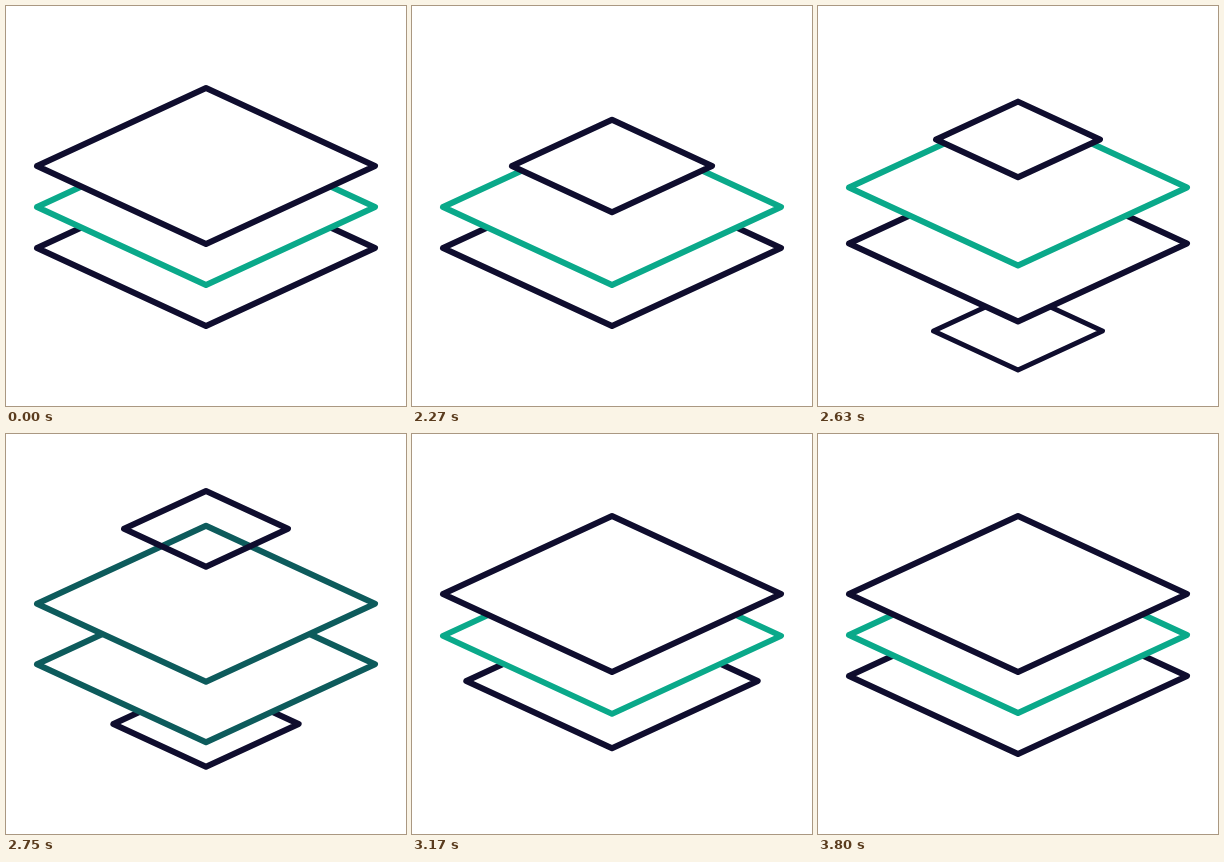
An HTML page that plays this animation: 400 px wide and 400 px high, repeating every 3.83 s.

```html
<!DOCTYPE html>
<html lang="en">
<head>
<meta charset="utf-8">
<title>Layer stack</title>
<style>
  html, body { margin: 0; width: 100%; height: 100%; overflow: hidden; background: #fff; }
  svg { display: block; width: 100vw; height: 100vh; }
  polygon { fill: #fff; stroke-linejoin: round; }
</style>
</head>
<body>
<svg viewBox="0 0 400 400">
  <polygon id="incoming"/>
  <polygon id="lower"/>
  <polygon id="middle"/>
  <polygon id="upper"/>
</svg>
<script>
const LOOP = 3830, HOLD = 2030, STEP = 30;
const NAVY = [15, 13, 46], GREEN = [10, 169, 138];
const HALF_W = 169, HALF_H = 78, STROKE = 6, SMALL = 0.485;
const REST = { upper: 160, middle: 201, lower: 242 };

const mix = (a, b, p) => a + (b - a) * p;
const span = (t, start, end) => Math.min(1, Math.max(0, (t - start) / (end - start)));
const smooth = x => x * x * (3 - 2 * x);
const blend = (from, to, p) => `rgb(${from.map((c, i) => Math.round(mix(c, to[i], p)))})`;

// Cubic easing with control points (a, 0) and (b, 1).
function bezier(a, b) {
  return x => {
    if (x <= 0 || x >= 1) return x;
    let lo = 0, hi = 1;
    for (let i = 0; i < 24; i++) {
      const s = (lo + hi) / 2, r = 1 - s;
      if (3 * a * s * r * r + 3 * b * s * s * r + s * s * s < x) lo = s;
      else hi = s;
    }
    return smooth((lo + hi) / 2);
  };
}
const settle = bezier(0.45, 0.6);
const grow = bezier(0.363, 0.325);

function draw(id, y, { scale = 1, width = STROKE, color = blend(NAVY, NAVY, 0), fill = 1 } = {}) {
  const el = document.getElementById(id);
  const w = HALF_W * scale, h = HALF_H * scale;
  el.setAttribute("points", `200,${y - h} ${200 + w},${y} 200,${y + h} ${200 - w},${y}`);
  el.setAttribute("stroke", color);
  el.setAttribute("stroke-width", width);
  el.setAttribute("fill-opacity", fill);
  el.style.display = width > 0 ? "" : "none";
}

function render(t) {
  const tint = span(t, 2650, 2850);

  draw("upper", mix(REST.upper, 68, smooth(span(t, 2482, 2899))), {
    scale: mix(1, SMALL, smooth(span(t, 2005, 2380))),
    width: STROKE * (1 - span(t, 2800, 2900)),
    fill: 1 - span(t, 2640, 2740)
  });

  draw("middle", mix(REST.middle, REST.upper, smooth(span(t, 2340, 2940))), {
    color: blend(GREEN, NAVY, tint)
  });

  draw("lower", mix(REST.lower, REST.middle, settle(span(t, 2430, 3250))), {
    color: blend(NAVY, GREEN, tint)
  });

  // The new layer rises quickly, then eases up a little more as it grows.
  const scale = mix(SMALL, 1, grow(span(t, 2500, 3800)));
  const rise = mix(317.5, REST.lower, smooth(span(t, 2542, 2918)));
  draw("incoming", rise + 36 * (1 - scale), {
    scale,
    width: STROKE * span(t, 2540, 2650)
  });
}

const origin = performance.now();
function tick() {
  const t = (performance.now() - origin) % LOOP;
  render(t < HOLD ? 0 : HOLD + Math.floor((t - HOLD) / STEP) * STEP);
  requestAnimationFrame(tick);
}
tick();
</script>
</body>
</html>
```
